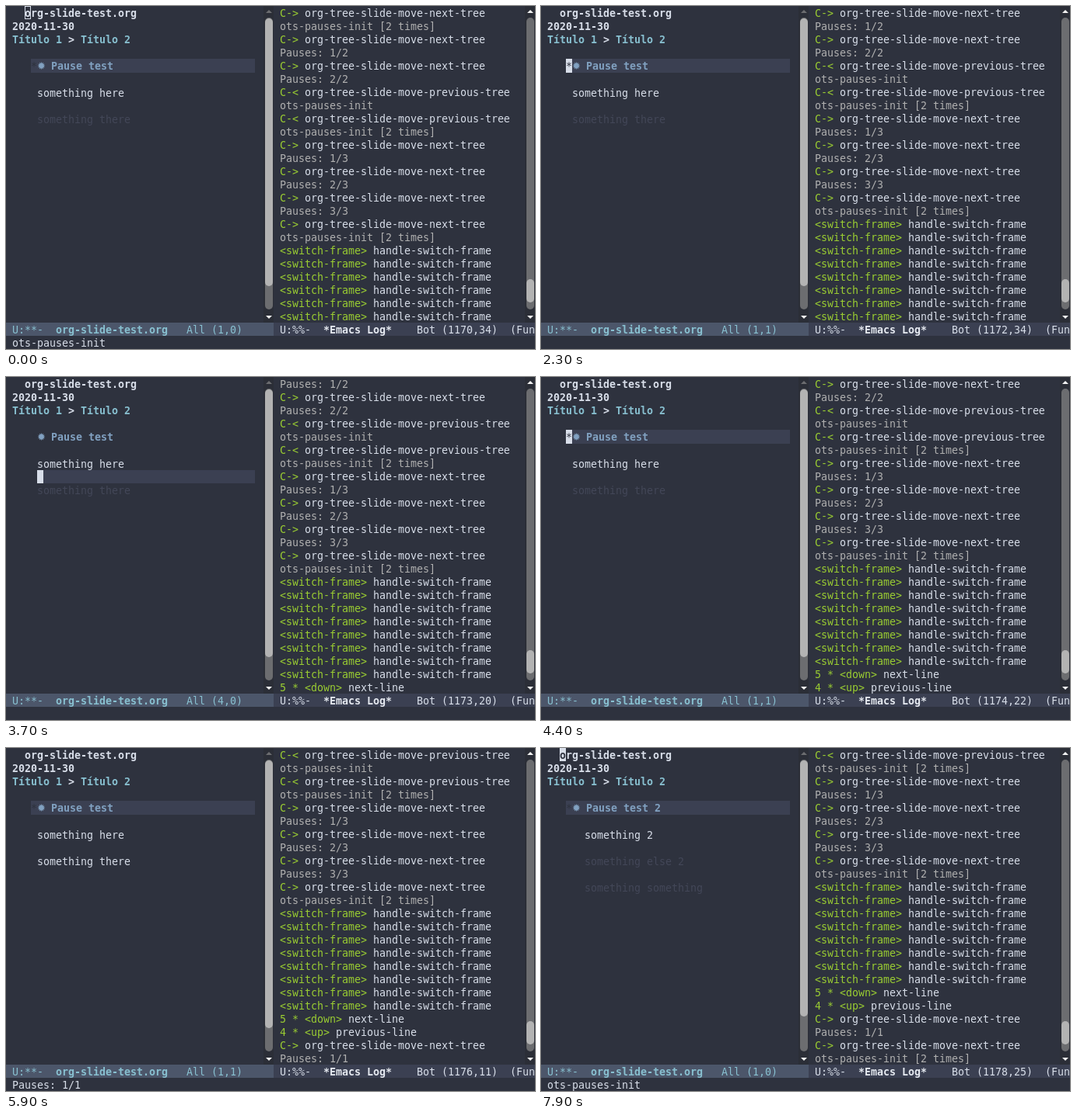
Write an HTML page that moves like this. It is 680 by 442 pixels and loops after 8000 ms.

```html
<!DOCTYPE html>
<html lang="en">
<head>
<meta charset="utf-8">
<style>
html, body { margin: 0; width: 100%; height: 100%; overflow: hidden; background: #2e323e; }
svg { display: block; width: 680px; height: 442px; }
text { font: 13.29px "DejaVu Sans Mono", monospace; white-space: pre; }
.b { font-weight: bold; }
</style>
</head>
<body>
<svg id="stage" viewBox="0 0 680 442"></svg>
<script>
const LOOP = 8000, STEP = 100, ROW = 17, CELL = 8, BASELINE = 14, LOG_ROWS = 24;
const HEADING = 4, MODE_Y = 408, ECHO_Y = 425;
const C = {
  bg: '#2e323e', fg: '#d8dee9', line: '#3b4052', dim: '#434758', blue: '#81a1c1', cyan: '#88c0d0',
  key: '#9acd32', note: '#b0b0b0', active: '#4c566a', trough: '#6c6d70', thumb: '#b3b3b3', white: '#f4f4f4'
};
const stage = document.getElementById('stage');

// Times of key presses; the log follows one step later.
const downs = [2300, 2500, 2600, 2800, 2900];
const ups = [3700, 3900, 4100, 4300];
const focus = [300, 600];
const reveal = 5200, nextSlide = 6800;
const inputs = [...focus, ...downs, ...ups, reveal, nextSlide];
const count = (times, t) => times.filter(x => x <= t).length;

const esc = s => s.replace(/&/g, '&amp;').replace(/</g, '&lt;').replace(/>/g, '&gt;');
const rect = (x, y, w, h, fill, extra = '') =>
  `<rect x="${x}" y="${y}" width="${w}" height="${h}" fill="${fill}" ${extra}/>`;
const text = (x, top, s, fill = C.fg, bold = false) =>
  `<text x="${x}" y="${top + BASELINE}" fill="${fill}"${bold ? ' class="b"' : ''}>${esc(s)}</text>`;

// The bullet makes the heading row one pixel taller.
const slideTop = row => row * ROW + (row > HEADING ? 1 : 0);
const slideHeight = row => slideTop(row + 1) - slideTop(row);
const slideText = (x, row, ...rest) => text(x, slideTop(row), ...rest);

const command = (key, name, n = 1) => ({ key: (n > 1 ? n + ' * ' : '') + key, name });
const note = s => ({ note: s });
const next = () => command('C->', 'org-tree-slide-move-next-tree');
const back = () => command('C-<', 'org-tree-slide-move-previous-tree');
const INIT = 'ots-pauses-init', TWICE = INIT + ' [2 times]';

function logLines(t) {
  const lines = [
    next(), note(TWICE), next(), note('Pauses: 1/2'), next(), note('Pauses: 2/2'),
    back(), note(INIT), back(), note(TWICE)
  ];
  for (let i = 1; i <= 3; i++) lines.push(next(), note(`Pauses: ${i}/3`));
  lines.push(next(), note(TWICE));
  for (let i = 0; i < 6 + count(focus, t); i++) lines.push(command('<switch-frame>', 'handle-switch-frame'));
  const d = count(downs, t - STEP), u = count(ups, t - STEP);
  if (d) lines.push(command('<down>', 'next-line', d));
  if (u) lines.push(command('<up>', 'previous-line', u));
  if (t >= reveal) lines.push(next(), note('Pauses: 1/1'));
  if (t >= nextSlide) lines.push(next(), note(TWICE));
  return lines;
}

function star(cx, cy) {
  const pts = Array.from({ length: 24 }, (_, i) => {
    const a = i * Math.PI / 12, r = i % 2 ? 3 : 4.9;
    return (cx + r * Math.sin(a)).toFixed(2) + ',' + (cy - r * Math.cos(a)).toFixed(2);
  });
  return `<polygon points="${pts.join(' ')}" fill="${C.blue}"/>`;
}

function scrollbar(x, top, bottom, upColor) {
  const m = x + 5;
  return rect(x - 2, 0, 13, MODE_Y, '#2b2e37')
    + `<path d="M${m - 4} 9L${m} 5L${m + 4} 9Z" fill="${upColor}"/>`
    + `<path d="M${m - 4} 399L${m} 403L${m + 4} 399Z" fill="${C.white}"/>`
    + rect(x, 15, 10, 376, C.trough, 'rx="5"')
    + rect(x, top, 10, bottom - top, C.thumb, 'rx="5"');
}

// Point in the slide buffer: screen row, file line and column.
function pointAt(t) {
  const step = t >= nextSlide ? 0 : count(downs, t) - count(ups, t);
  if (!step) return { x: 24, row: 0, pos: '(1,0)', char: 'o', bold: true };
  const row = step + HEADING - 1;
  if (row === HEADING) return { x: 32, row, pos: '(1,1)', char: '*' };
  return { x: 40, row, pos: `(${[2, 3, 4, 7][row - 5]},0)`, char: row % 2 ? '' : 's' };
}

function cursor(t, p) {
  const y = slideTop(p.row), h = slideHeight(p.row);
  if (t < focus[0]) return rect(p.x + .5, y + .5, CELL - 1, h - 1, 'none', `stroke="${C.fg}"`);
  const last = Math.max(...inputs.filter(x => x <= t));
  if (Math.floor((t - last) / 500) % 2) return '';
  return rect(p.x, y, CELL, h, C.fg) + text(p.x, y, p.char, C.bg, p.bold);
}

function slide(t, p) {
  const second = t >= nextSlide;
  const hlRow = Math.max(HEADING, p.row), hlX = hlRow === HEADING ? 32 : 40;
  let out = rect(hlX, slideTop(hlRow), 320 - hlX, slideHeight(hlRow), C.line)
    + slideText(24, 0, 'org-slide-test.org', C.fg, true)
    + slideText(8, 1, '2020-11-30', C.fg, true)
    + slideText(8, 2, 'Título 1', C.cyan, true)
    + slideText(80, 2, '>', C.fg, true)
    + slideText(96, 2, 'Título 2', C.cyan, true)
    + slideText(32, HEADING, '*', C.bg) + star(45.5, 77)
    + slideText(58, HEADING, second ? 'Pause test 2' : 'Pause test', C.blue, true);
  out += second
    ? slideText(56, 6, 'something 2')
      + slideText(56, 8, 'something else 2', C.dim)
      + slideText(56, 10, 'something something', C.dim)
    : slideText(40, 6, 'something here')
      + slideText(40, 8, 'something there', t >= reveal ? C.fg : C.dim);
  return out + cursor(t, p);
}

function logPane(lines) {
  return lines.slice(-LOG_ROWS).map((l, i) => l.note
    ? text(352, i * ROW, l.note, C.note)
    : text(352, i * ROW, l.key, C.key) + text(352 + (l.key.length + 1) * CELL, i * ROW, l.name)).join('');
}

function modeLines(p, lines) {
  const last = lines[lines.length - 1];
  const col = (last.note || last.key + ' ' + last.name).length;
  const pos = `(${1146 + lines.length},${col})`;
  return rect(0, MODE_Y, 344, ROW, C.active) + rect(344, MODE_Y, 336, ROW, C.line)
    + text(8, MODE_Y, 'U:**-', C.cyan) + text(64, MODE_Y, 'org-slide-test.org', C.cyan, true)
    + text(232, MODE_Y, 'All ' + p.pos, C.cyan)
    + text(352, MODE_Y, 'U:%%-') + text(408, MODE_Y, '*Emacs Log*', '#e5e9f0', true)
    + text(528, MODE_Y, `Bot ${pos}  (Fundamental`);
}

function echo(t) {
  if (t < focus[0] || t >= nextSlide) return INIT;
  return t >= reveal ? 'Pauses: 1/1' : '';
}

function draw(t) {
  const p = pointAt(t), lines = logLines(t);
  stage.innerHTML = rect(0, 0, 680, 442, C.bg)
    + slide(t, p) + logPane(lines)
    + scrollbar(333, 16, t >= nextSlide ? 346 : 361, C.trough)
    + scrollbar(669, 352, 382, C.white)
    + modeLines(p, lines) + text(8, ECHO_Y, echo(t));
}

const start = performance.now();
let shown = -1;
function tick() {
  const t = Math.floor((performance.now() - start) % LOOP / STEP) * STEP;
  if (t !== shown) draw(shown = t);
  requestAnimationFrame(tick);
}
tick();
</script>
</body>
</html>
```
